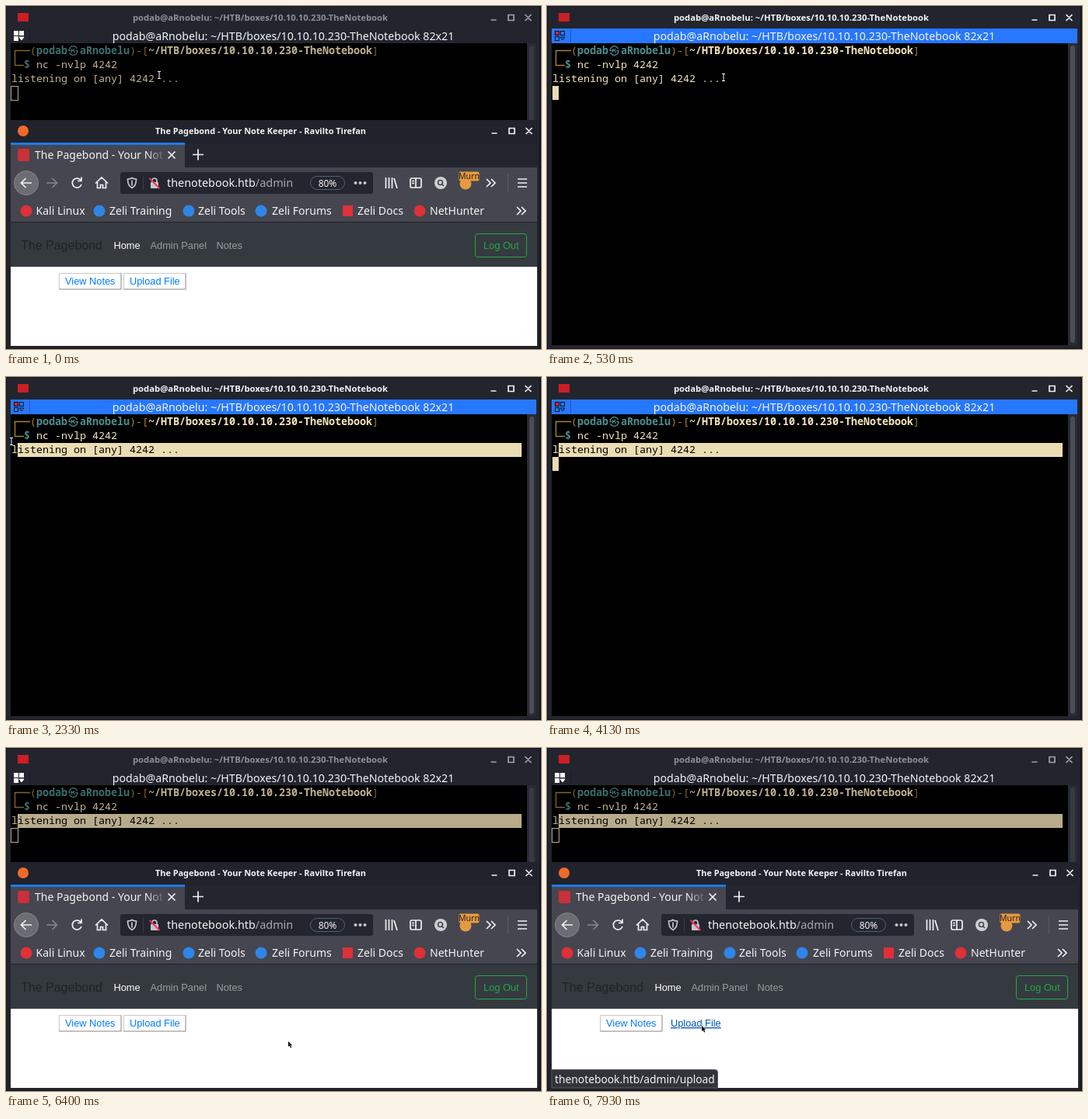
Recreate the animation shown at these times as an HTML page. Size 688 by 442 pixels, loop 8 s.

```html
<!DOCTYPE html>
<html lang="en">
<head>
<meta charset="utf-8">
<title>Listener and admin page</title>
<style>
html, body { margin: 0; width: 100%; height: 100%; overflow: hidden; background: #22252e; }
svg { display: block; width: 688px; height: 442px; }
text { font: 14.4px 'Noto Sans', sans-serif; fill: #f4f4f6; white-space: pre; }
.title { font-size: 11.3px; font-weight: bold; text-anchor: middle; }
.mono text { font: 500 13.33px 'Noto Sans Mono', monospace; fill: #f6e5be; }
.mono .b { font-weight: bold; }
.mono .gold { fill: #a8822f; }
.mono .teal { fill: #4f8d90; }
.mono .dark { fill: #000; }
.page text { font: 12.8px 'Liberation Sans', Arial, sans-serif; }
.page .link { fill: #007bff; }
.marks text { font-size: 14px; }
.line { fill: none; stroke: #f0f0f2; stroke-width: 1.7; }
.bar { fill: #2777ff; }
.off .bar { fill: #22252e; }
.off .mono { opacity: .78; }
.off .title { fill: #8f9197; }
.off .ctl { stroke: #a2a4a9; }
.off .slider { fill: #383a43; }
.hover .up { fill: #0056b3; text-decoration: underline; }
.hover .edge { display: none; }
</style>
</head>
<body>
<svg viewBox="0 0 688 442">
  <defs>
    <linearGradient id="fade"><stop offset="0" stop-color="#45464f" stop-opacity="0"/><stop offset="1" stop-color="#45464f"/></linearGradient>
    <clipPath id="picked"><rect id="range" y="85" height="18"/></clipPath>
    <path id="ctl" d="M0-1h7M22.500-7.500h7v7h-7zM44-8l8 8m0-8l-8 8"/>
    <g id="btn"><path d="M0 21V0H80" fill="none" stroke="#c8c8c8"/><path d="M0 20.500H79.500V0" fill="none" stroke="#858585"/></g>
    <path id="more" class="line" d="M0 0l5 5-5 5m6-10l5 5-5 5"/>
  </defs>

  <rect width="688" height="442" fill="#22252e"/>
  <g id="term">
    <rect x="15" y="9" width="14" height="11" fill="#cc1f24"/>
    <text class="title" x="327" y="19">podab@aRnobelu: ~/HTB/boxes/10.10.10.230-TheNotebook</text>
    <use href="#ctl" class="line ctl" x="623.500" y="19"/>
    <rect class="bar" x="6" y="29" width="676" height="19"/>
    <g id="split" stroke-width="1">
      <rect x="10.500" y="32.500" width="5" height="5"/><rect x="17.500" y="32.500" width="5" height="5"/>
      <rect x="10.500" y="39.500" width="5" height="5"/><path d="M17 40h6l-3 4z"/>
    </g>
    <path d="M30.500 30v17" stroke="#000" stroke-opacity=".25"/>
    <text x="356.500" y="44" style="font-size:14.2px" text-anchor="middle">podab@aRnobelu: ~/HTB/boxes/10.10.10.230-TheNotebook 82x21</text>
    <rect x="6" y="48" width="664" height="389"/>
    <rect x="670" y="48" width="12" height="389" fill="#292c35"/>
    <rect class="slider" x="673" y="51" width="6" height="383" rx="3" fill="#4b4e58"/>
    <g class="mono">
      <path d="M31 57.500H11.500V76.500H23" fill="none" stroke="#a8822f" stroke-width="1.400"/>
      <text class="gold" x="31" y="62">(</text>
      <text class="teal b" x="39" y="62">podab</text>
      <text class="teal b" x="80" y="62" style="font:bold 13px 'Noto Sans CJK JP','Noto Sans CJK SC',sans-serif">㉿</text>
      <text class="teal b" x="95" y="62">aRnobelu</text>
      <text class="gold" x="159" y="62">)-[</text>
      <text class="b" x="183" y="62">~/HTB/boxes/10.10.10.230-TheNotebook</text>
      <text class="gold" x="471" y="62">]</text>
      <text class="teal b" x="23" y="80">$</text>
      <text x="39" y="80">nc -nvlp 4242</text>
      <text x="7" y="98">listening on [any] 4242 ...</text>
      <g clip-path="url(#picked)">
        <rect x="7" y="85" width="656" height="18" fill="#ecdcb3"/>
        <text class="dark" x="7" y="98">listening on [any] 4242 ...</text>
      </g>
      <rect id="caret" stroke="#ecdcb3"/>
    </g>
  </g>

  <g id="web">
    <rect y="147" width="686" height="295" fill="#20232c"/>
    <circle cx="22" cy="161" r="7" fill="#f06a2a"/>
    <text class="title" x="327.500" y="165" style="font-size:10.9px">The Pagebond - Your Note Keeper - Ravilto Tirefan</text>
    <use href="#ctl" class="line" x="624.500" y="165"/>
    <rect x="6" y="177" width="677" height="31" fill="#23252f"/>
    <rect x="6" y="177" width="224" height="31" fill="#45464f"/>
    <rect x="6" y="176" width="224" height="3" fill="#1c7bf5"/>
    <rect x="15" y="184" width="15" height="16" rx="2" fill="#c9303a"/>
    <text x="37" y="197" style="font-size:14px">The Pagebond - Your Not</text>
    <rect x="181" y="180" width="24" height="27" fill="url(#fade)"/>
    <path class="line" d="M208.500 187.500l9 9m0-9l-9 9M240 191.500h14m-7-7v14"/>

    <rect x="6" y="208" width="677" height="70" fill="#45464f"/>
    <circle cx="26" cy="228" r="15.500" fill="#6c6d74" stroke="#85868c"/>
    <path class="line" d="M33 228H19.500m6-6l-6 6 6 6"/>
    <path class="line" d="M52 228H65.500m-6-6l6 6-6 6" style="stroke:#85868c"/>
    <path class="line" d="M96.500 225a6 6 0 1 0 .5 5M97 220.500v5h-5"/>
    <path class="line" d="M115 228.500l8-7.500 8 7.500M117.500 227v7.500h4v-4h3v4h4V227"/>
    <rect x="147" y="214" width="325" height="28" rx="3" fill="#23262f"/>
    <path d="M176.500 219v19" stroke="#3a3c45"/>
    <path class="line" d="M162 221.500c2 1.500 4 1.500 5.500 1.500 0 6-1.500 9.500-5.500 11.500-4-2-5.500-5.500-5.500-11.500 1.500 0 3.500 0 5.500-1.500zm0 3v7" style="stroke:#c5c6ca"/>
    <rect x="186" y="227" width="10" height="8" rx="1" fill="#c5c6ca"/>
    <path class="line" d="M188 227v-2a3 3 0 0 1 6 0v2" style="stroke:#c5c6ca"/>
    <path d="M184.500 222l13 13" stroke="#ff2f55" stroke-width="2"/>
    <text x="207" y="233">thenotebook.htb<tspan fill="#a8a9af">/admin</tspan></text>
    <rect x="391.500" y="219.500" width="44" height="17" rx="8.500" fill="#23262f" stroke="#4f6072"/>
    <text x="413.500" y="232.500" text-anchor="middle" style="font-size:12px">80%</text>
    <g fill="#c5c6ca"><circle cx="449.500" cy="228" r="2"/><circle cx="455.500" cy="228" r="2"/><circle cx="461.500" cy="228" r="2"/></g>
    <path class="line" d="M488.500 221v14m4-14v14m4-14v14m2.500-13l4 13"/>
    <rect class="line" x="520" y="222" width="14" height="12" rx="2"/>
    <path class="line" d="M527 222v12m-5-8.500h3m-3 3h3"/>
    <circle cx="559" cy="228" r="8" fill="#d0d0d3"/>
    <circle cx="558.500" cy="227.500" r="3" fill="none" stroke="#45464f" stroke-width="1.600"/><path d="M560 229l3 3" stroke="#45464f" stroke-width="1.600"/>
    <circle cx="591" cy="229" r="7.500" fill="#e39a43"/>
    <rect x="582.500" y="213.500" width="26" height="12" rx="2" fill="#e8983f"/>
    <text x="595.500" y="223" text-anchor="middle" style="font-size:10.500px;fill:#222">Murn</text>
    <use href="#more" x="618" y="223"/>
    <path d="M645.500 216v24" stroke="#5b5c65"/>
    <path class="line" d="M658 223h12m-12 5h12m-12 5h12"/>

    <g class="marks">
      <g fill="#e03038"><circle cx="26" cy="264" r="7.500"/><rect x="433" y="257" width="13" height="14"/><circle cx="532" cy="264" r="7.500"/></g>
      <g fill="#2f86e8"><circle cx="120" cy="264" r="7.500"/><circle cx="235" cy="264" r="7.500"/><circle cx="328" cy="264" r="7.500"/></g>
      <text x="38.500" y="269">Kali Linux</text><text x="133" y="269">Zeli Training</text>
      <text x="247" y="269">Zeli Tools</text><text x="342" y="269">Zeli Forums</text>
      <text x="452" y="269">Zeli Docs</text><text x="545" y="269">NetHunter</text>
      <use href="#more" x="657" y="259"/>
    </g>

    <g class="page">
      <rect x="6" y="279" width="677" height="57" fill="#343a40"/>
      <rect x="6" y="336" width="677" height="102" fill="#fff"/>
      <text x="19" y="314" style="font-size:16px;fill:#1f2327">The Pagebond</text>
      <text x="138.500" y="313" style="fill:#fff">Home</text>
      <text x="185.500" y="313" style="fill:#999da0">Admin Panel</text>
      <text x="270.500" y="313" style="fill:#999da0">Notes</text>
      <rect x="603.500" y="293.500" width="66" height="30" rx="3" fill="none" stroke="#28a745"/>
      <text x="614" y="313" style="fill:#28a745">Log Out</text>
      <use href="#btn" x="68.500" y="344.500"/>
      <text class="link" x="76" y="359">View Notes</text>
      <use class="edge" href="#btn" x="151.500" y="344.500"/>
      <text class="link up" x="159" y="359">Upload File</text>
    </g>
    <g id="status">
      <path d="M6 414.500H216q3.500 0 3.500 3.500V438H6z" fill="#32343c" stroke="#595b63"/>
      <text x="10" y="431.500" style="font-size:13.8px">thenotebook.htb/admin/upload</text>
    </g>
  </g>
  <rect x=".5" y=".5" width="686" height="441" fill="none" stroke="#14161c"/>
  <path d="M687.500 0v442" stroke="#14161c"/>

  <g id="mouse">
    <g id="beam" fill="none">
      <path d="M-2-4.500H2M0-4.500V4.500M-2 4.500H2" stroke="#000" stroke-width="2.600"/>
      <path d="M-2-4.500H2M0-4.500V4.500M-2 4.500H2" stroke="#fff"/>
    </g>
    <path id="arrow" d="M0 0V7l1.700-1.500L3 8.500l1.300-.6L3 5.200h2.200z" fill="#000" stroke="#fff" stroke-width=".8" paint-order="stroke"/>
  </g>
</svg>
<script>
const $ = id => document.getElementById(id);
const show = (id, on) => $(id).style.display = on ? '' : 'none';
const set = (id, attrs) => Object.entries(attrs).forEach(([k, v]) => $(id).setAttribute(k, v));

// Pointer path: [tick, x, y], 15 ticks per second
const path = [[1, 197, 89], [5, 227, 92], [9, 227, 92], [22, 25, 87], [27, 7, 83], [40, 7, 83], [45, 337, 12],
  [76, 376, 46], [86, 363, 378], [96, 363, 378], [108, 295, 367], [119, 199, 358]];

function pointer(tick) {
  const i = path.findIndex(p => p[0] >= tick);
  if (i < 1) return path[0].slice(1);
  const [a, ax, ay] = path[i - 1], [b, bx, by] = path[i];
  const k = (tick - a) / (b - a);
  return [ax + (bx - ax) * k, ay + (by - ay) * k].map(Math.round);
}

function draw(ms) {
  const tick = Math.floor((ms % 8000 + 4) * 0.015);
  const [x, y] = pointer(tick);
  const focus = tick >= 8 && tick < 69;
  $('term').classList.toggle('off', !focus);
  set('split', focus ? { fill: '#2777ff', stroke: '#10131c' } : { fill: '#fff', stroke: '#fff' });
  $('split').firstElementChild.setAttribute('fill', focus ? '#d3222a' : '#fff');
  show('web', !focus);

  const col = tick < 10 ? 82 : tick > 27 ? 1 : Math.max(1, Math.round((x - 7) / 8));
  set('range', { x: 7 + col * 8, width: (82 - col) * 8 });
  set('caret', focus ? { x: 7, y: 103, width: 8, height: 18, fill: '#ecdcb3', 'stroke-width': 0 }
    : { x: 6.5, y: 103.5, width: 9, height: 18, fill: 'none', 'stroke-width': 1 });
  show('caret', !focus || (tick - 8) % 18 < 9);

  const hover = tick > 108 && x < 231;
  $('web').classList.toggle('hover', hover);
  show('status', hover);

  const beam = y > 48 && y < 147;
  show('mouse', tick < 46 || tick >= 76);
  show('beam', beam);
  show('arrow', !beam);
  set('mouse', { transform: `translate(${x} ${y})` });
}

const start = performance.now();
function loop() {
  draw(performance.now() - start);
  requestAnimationFrame(loop);
}
loop();
</script>
</body>
</html>
```
